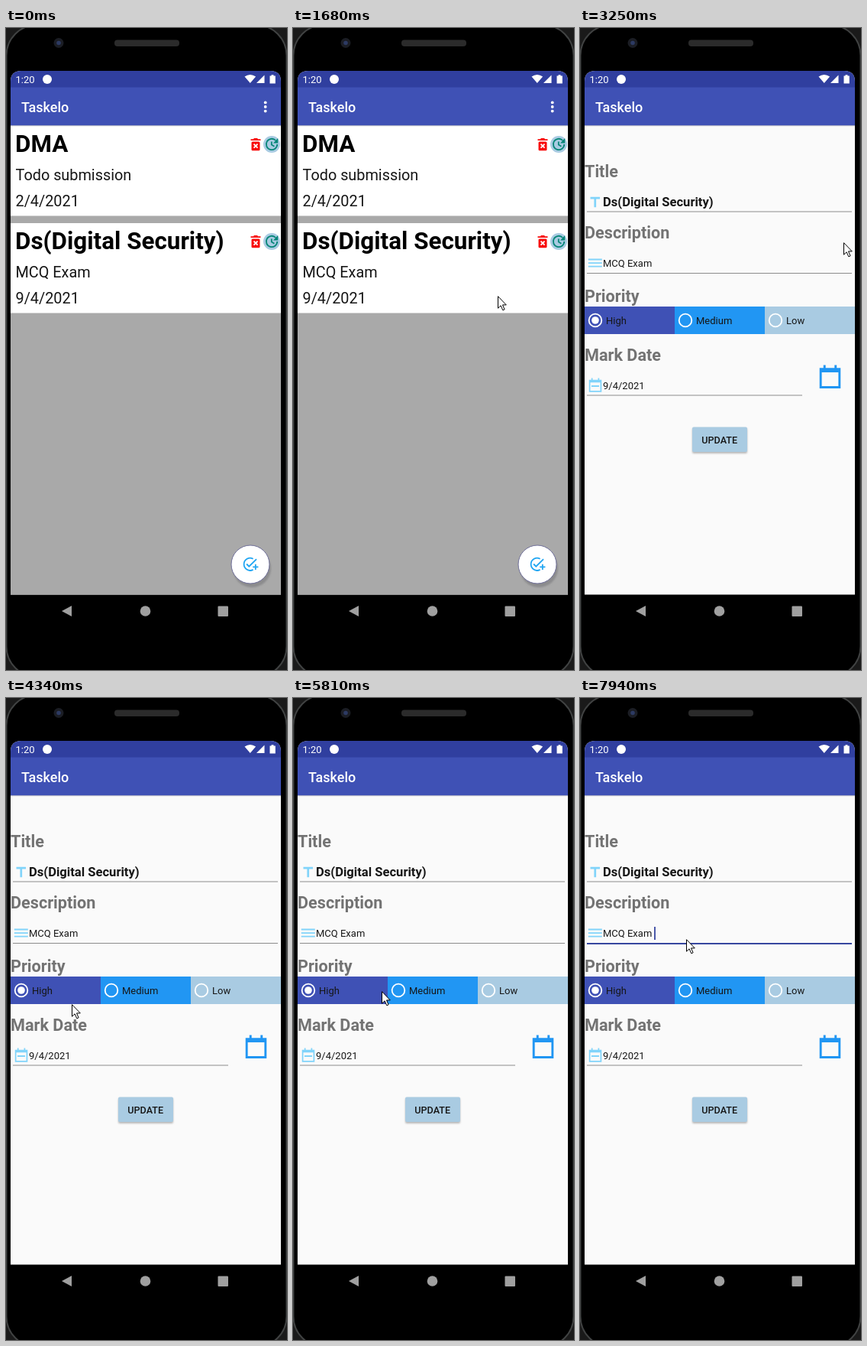
These frames come from a looping animation (368x839 px, 8 s). An HTML page:

```html
<!DOCTYPE html>
<html lang="en">
<head>
<meta charset="utf-8">
<title>Taskelo</title>
<style>
  html, body { margin: 0; height: 100%; overflow: hidden; background: #000; }
  svg { display: block; width: 100vw; height: 100vh; }
  text { font-family: Roboto, sans-serif; font-size: 13px; fill: #161616; }
  .bar { font-size: 18px; font-weight: 500; fill: #fff; }
  .head { font-size: 31.4px; font-weight: 700; fill: #000; }
  .body { font-size: 19.85px; }
  .label { font-size: 21.64px; font-weight: 700; fill: #737373; }
  .name { font-size: 16.6px; font-weight: 700; }
  .button { font-size: 12.6px; font-weight: 500; text-anchor: middle; }
  .icon { fill: none; stroke-width: 1.8; }
  .line { stroke: #8c8c8c; }
</style>
</head>
<body>
<svg viewBox="0 0 368 839">
  <defs>
    <clipPath id="screen"><path d="M6 740.5V70q0-14 14-14h326q14 0 14 14v670.5z"/></clipPath>
    <filter id="blur" x="-20%" y="-20%" width="140%" height="140%"><feGaussianBlur stdDeviation="1"/></filter>
    <path id="calendar" fill="none" stroke-width="2" d="M3.5 4.5h17V21h-17zM3.5 6.5h17M7 1v3M17 1v3"/>
    <g id="trash">
      <path class="icon" stroke="#f80b0b" d="M320.500 146.200h13M324.500 144.800h5"/>
      <rect x="321.500" y="148.500" width="11" height="11.700" rx="1.500" fill="#f80b0b"/>
      <path class="icon" stroke="#fff" d="M324.500 151.700l5 5m0-5l-5 5"/>
    </g>
    <g id="update" transform="translate(348 152)">
      <circle r="11" fill="#a9cbe2"/>
      <path class="icon" stroke="#078678" d="M7.200 0a7.200 7.200 0 1 1-2-5M-.2-3.600V.6l3.600 2.100"/>
      <path fill="#078678" d="M8.100-8v6.400H2z"/>
    </g>
  </defs>

  <!-- phone body -->
  <rect width="368" height="839" fill="#1a1a1a"/>
  <rect x=".5" y="-4" width="367" height="852" rx="40" stroke="#404242" stroke-width="2"/>
  <circle cx="69" cy="19.5" r="6.5" fill="#1b1d24"/>
  <circle cx="69" cy="19.5" r="2.8" fill="#2c3a63"/>
  <rect x="142" y="15.5" width="85" height="8.5" rx="4" fill="#2b2b2b"/>
  <g fill="#a0a0a0">
    <path d="M73 762l13-7v14z"/>
    <circle cx="182.5" cy="762" r="6.8"/>
    <rect x="277.5" y="755.5" width="13.5" height="13.5" rx="1"/>
  </g>

  <g clip-path="url(#screen)">
    <path fill="#fafafa" d="M6 56h354v685H6z"/>

    <g id="list">
      <path fill="#a9a9a9" d="M6 127h354v614H6z"/>
      <g id="cards"></g>
      <circle cx="322" cy="706" r="25" fill="#8b8b8d" filter="url(#blur)"/>
      <circle cx="320" cy="701" r="25" fill="#fff" stroke="#70709a"/>
      <path class="icon" stroke="#1fa5f2" transform="translate(319.600 700.800)"
        d="M4-7.100a8.100 8.100 0 1 0 0 14.200M-4.500-.3l3.200 3.200 9.700-9.600M3.600 3.600h7.200M7.200 0v7.200"/>
    </g>

    <g id="form">
      <g id="labels"></g>
      <g class="icon" stroke="#81d4fa">
        <path d="M13.500 222.200h12.600M19.800 222v12.300" stroke-width="2.700"/>
        <path d="M10.800 302.500h18m-18 4.600h18m-18 4.500h18M15 468h10" stroke-dasharray="none"/>
        <use href="#calendar" transform="translate(9.600 456.600) scale(.87)"/>
      </g>
      <text class="name" x="30" y="233.3">Ds(Digital Security)</text>
      <text x="30" y="312.4">MCQ Exam</text>
      <text x="30" y="471.6">9/4/2021</text>
      <path class="line" d="M9 240h347M9 480h282"/>
      <path id="rule" class="line" d="M9 320.5h347"/>
      <path id="focus" stroke="#37479f" stroke-width="2" d="M9 321h347"/>
      <path id="caret" stroke="#37479f" stroke-width="1.8" d="M98 299v17"/>
      <g id="radios"></g>
      <circle cx="20" cy="382" r="4.8" fill="#fff"/>
      <use href="#calendar" stroke="#2196f3" transform="translate(310.100 439.100) scale(1.45)"/>
      <rect x="147" y="523" width="72" height="33" rx="2" fill="#b8b8b8" filter="url(#blur)"/>
      <rect x="147" y="521.5" width="72" height="32.5" rx="2" fill="#a9cbe2"/>
      <text class="button" x="182.7" y="542.6">UPDATE</text>
    </g>

    <!-- status bar and toolbar -->
    <path fill="#c4c4c8" d="M6 127h354v1.300H6z"/>
    <path fill="#3f51b5" d="M6 77h354v50.200H6z"/>
    <path fill="#303f9f" d="M6 56h354v21.500H6z"/>
    <text class="bar" x="20" y="110">Taskelo</text>
    <g fill="#fff">
      <text x="12.5" y="71.6" style="fill:#fff">1:20</text>
      <circle cx="54" cy="67" r="6"/>
      <path d="M312.500 63.500q7.300-5 14.600 0L319.800 72zM345.500 62.500h2v-1.300h3v1.300h2.300v10h-7.300z"/>
      <path d="M338.500 61.500V72H328z"/>
      <g id="menu"></g>
    </g>
  </g>

  <path id="cursor" d="M.5.700v15.500l3.600-3.400 2.700 6 2.300-1-2.600-5.900h4.800z" fill="#fff" stroke="#000"/>
</svg>
<script>
  const $ = id => document.getElementById(id);
  const fill = (id, items, markup) => $(id).innerHTML = items.map(markup).join("");
  const show = (id, on) => $(id).style.display = on ? "" : "none";

  const tasks = [
    ["DMA", "Todo submission", "2/4/2021"],
    ["Ds(Digital Security)", "MCQ Exam", "9/4/2021"]
  ];
  fill("cards", tasks, ([title, note, date], i) => `<g transform="translate(0 ${127 * i})">
    <path fill="#fff" d="M6 128h354v117.600H6z"/>
    <text class="head" x="12" y="161.500">${title}</text>
    <text class="body" x="12.500" y="198.700">${note}</text>
    <text class="body" x="12.500" y="233">${date}</text>
    <use href="#trash"/><use href="#update"/></g>`);
  fill("labels", ["Title", "Description", "Priority", "Mark Date"], (label, i) =>
    `<text class="label" x="6" y="${194.5 + 80 * i}">${label}</text>`);
  fill("radios", [["High", "#3f51b5"], ["Medium", "#2196f3"], ["Low", "#a9cbe2"]], ([label, color], i) =>
    `<g transform="translate(${6 + 118 * i} 364)"><path fill="${color}" d="M0 0h118v36H0z"/>
    <circle cx="14" cy="18" r="8.3" class="icon" stroke="#fff"/><text x="28" y="23">${label}</text></g>`);
  fill("menu", [-1, 0, 1], i => `<circle cx="339.700" cy="${103 + 5.6 * i}" r="1.900"/>`);
  $("labels").children[2].setAttribute("y", 358.3);

  const LOOP = 8000, TICK = 133.3, START = 555, OPEN = 3250, FOCUS = 7820, CARET = 7940;
  // pointer moves: first tick, length in ticks, end x, end y
  const moves = [
    [0, 1, 349, 380], [1, 2, 198, 279], [4, 2, 233, 338], [6, 3, 280, 354], [9, 4, 345, 280],
    [23, 3, 204, 413], [26, 2, 86, 400], [28, 2, 55, 399], [32, 4, 134, 383], [38, 4, 18, 386],
    [44, 3, 143, 314], [48, 2, 165, 261], [50, 1, 139, 321], [53, 1, 139, 315]
  ];

  function pointer(tick) {
    let x = 336, y = 452;
    for (const [from, length, endX, endY] of moves) {
      const p = Math.min(1, Math.max(0, (tick - from) / length));
      const eased = p * p * (3 - 2 * p);
      x += (endX - x) * eased;
      y += (endY - y) * eased;
    }
    return `translate(${Math.round(x)} ${Math.round(y)})`;
  }

  function draw(now) {
    const t = now % LOOP;
    const tick = Math.floor((t - START) / TICK);
    show("cursor", tick >= 0);
    $("cursor").setAttribute("transform", pointer(tick));
    show("list", t < OPEN);
    show("menu", t < OPEN);
    show("form", t >= OPEN);
    show("rule", t < FOCUS);
    show("focus", t >= FOCUS);
    show("caret", t >= CARET);
    requestAnimationFrame(draw);
  }
  draw(0);
</script>
</body>
</html>
```
